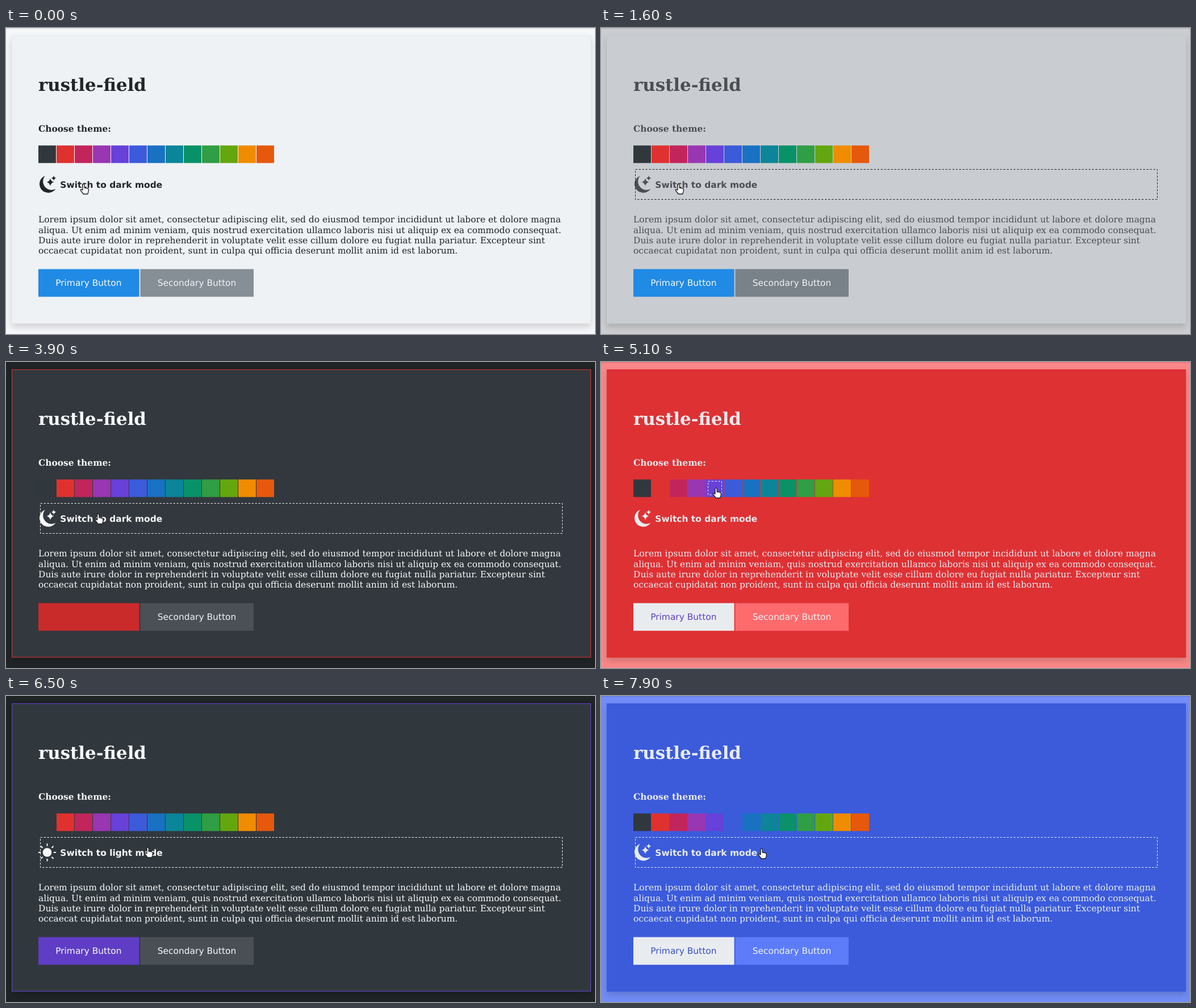
Animation, 1037 px wide and 540 px high, one loop 8 s. Source, as an HTML page:

```html
<!DOCTYPE html>
<html lang="en">
<head>
<meta charset="utf-8">
<title>Theme switcher</title>
<style>
  html, body { margin: 0; width: 100%; height: 100%; overflow: hidden; }
  svg { display: block; width: 1037px; height: 540px; background: var(--page); }
  text { font: 15.44px "DejaVu Serif", serif; text-rendering: geometricPrecision; fill: var(--text); }
  .title { font-size: 30.88px; font-weight: bold; }
  .label { font-weight: bold; }
  .sans { font-family: "DejaVu Sans", sans-serif; }
  .card { fill: var(--card); filter: drop-shadow(0 6px 6px rgba(0, 0, 0, .16)); }
  .edge { fill: none; stroke: var(--edge); }
  .icon { fill: var(--text); }
  .rays { stroke: var(--text); stroke-width: 2; }
  .focus { fill: none; stroke: var(--focus); stroke-dasharray: 3.4 2.6; }
  .primary { fill: var(--primary); }
  .secondary { fill: var(--secondary); }
  .on-primary { fill: var(--onPrimary); }
  .on-secondary { fill: var(--onSecondary); }
</style>
</head>
<body>
<svg id="stage" viewBox="0 0 1037 540">
  <rect width="1037" height="1.5" opacity=".1"/>
  <rect class="card" x="10" y="13" width="1020" height="508.5"/>
  <rect class="edge" x="10.5" y="13.5" width="1019" height="507.5"/>

  <text class="title" x="57" y="111">rustle-field</text>
  <text class="label" x="57" y="183">Choose theme:</text>
  <g id="swatches"></g>

  <g id="moon" class="icon">
    <path d="M69 260.8A15.5 15.5 0 1 0 87.3 284A15 15 0 0 1 69 260.8Z"/>
    <path d="M78 265.2Q79.2 270.8 84.6 272Q79.2 273.2 78 278.8Q76.8 273.2 71.4 272Q76.8 270.8 78 265.2Z"/>
    <path d="M84 260.6Q84.8 264.2 88.3 265Q84.8 265.8 84 269.4Q83.2 265.8 79.7 265Q83.2 264.2 84 260.6Z"/>
  </g>
  <g id="sun" class="icon">
    <circle cx="72.5" cy="276" r="7.8"/>
    <g id="rays" class="rays"></g>
  </g>
  <text id="toggle" class="label sans" x="95.3" y="281.5"></text>
  <rect id="focus" class="focus"/>

  <g id="copy"></g>

  <rect class="primary" x="57" y="425.5" width="177.6" height="48.8"/>
  <rect class="secondary" x="236.4" y="425.5" width="199.6" height="48.8"/>
  <text class="sans on-primary" x="87.2" y="455.3">Primary Button</text>
  <text class="sans on-secondary" x="266.8" y="455.3">Secondary Button</text>

  <path id="cursor" fill="#fff" stroke="#1b1b1b" stroke-width="1.3" stroke-linejoin="round"
    d="M-2 11V2a1.6 1.6 0 0 1 3.2 0V7l5 .9q2.3.5 2.2 2.5l-.5 4-1.2 3.6H-.8L-5.6 11.5q-.6-2 1.2-1.9z"/>
</svg>
<script>
const LOOP = 8000, TICK = 100, FADE = 500;
const $ = id => document.getElementById(id);
const stage = $('stage');

function add(parent, tag, attrs, content = '') {
  const el = document.createElementNS('http://www.w3.org/2000/svg', tag);
  for (const key in attrs) el.setAttribute(key, attrs[key]);
  el.textContent = content;
  parent.append(el);
}

const swatches = ['#31383d', '#e03131', '#c2255c', '#9936b2', '#6741d9', '#3b5bdb', '#1971c2',
  '#0c8599', '#099268', '#2f9e44', '#64a60f', '#f08c00', '#e6590c'];
const copy = [
  'Lorem ipsum dolor sit amet, consectetur adipiscing elit, sed do eiusmod tempor incididunt ut labore et dolore magna',
  'aliqua. Ut enim ad minim veniam, quis nostrud exercitation ullamco laboris nisi ut aliquip ex ea commodo consequat.',
  'Duis aute irure dolor in reprehenderit in voluptate velit esse cillum dolore eu fugiat nulla pariatur. Excepteur sint',
  'occaecat cupidatat non proident, sunt in culpa qui officia deserunt mollit anim id est laborum.'
];
swatches.forEach((fill, i) =>
  add($('swatches'), 'rect', { x: 57 + 32 * i, y: 207.3, width: 31, height: 31, fill }));
copy.forEach((line, i) => add($('copy'), 'text', { x: 57, y: 343.3 + 18.33 * i }, line));
for (let i = 0; i < 8; i++) {
  add($('rays'), 'path', { d: 'M72.5 264.8V260.4', transform: `rotate(${45 * i} 72.5 276)` });
}

const LIGHT = '#e9ecef', WHITE = '#f8f9fa', INK = '#212529';
const night = { page: '#1f2427', card: '#31383d', text: WHITE, secondary: '#4a4f56',
  focus: WHITE, onPrimary: WHITE, onSecondary: WHITE };

function theme(page, card, secondary, deep) {
  return {
    light: { page, card, edge: card, text: LIGHT, primary: LIGHT, secondary,
      focus: LIGHT, onPrimary: deep, onSecondary: '#f1f3f5' },
    dark: { ...night, edge: card, primary: deep }
  };
}
const plain = {
  light: { page: '#f6f7f9', card: '#eef2f5', edge: '#e9ecef', text: INK, primary: '#208ae5',
    secondary: '#868e96', focus: INK, onPrimary: WHITE, onSecondary: '#f1f3f5' },
  dark: { ...night, edge: '#343a40', primary: '#208ae5' }
};
const red = theme('#fc8886', '#e03131', '#ff6b6b', '#c92a2a');
const violet = theme('#9775fa', '#6741d9', '#845ef7', '#5f3dc4');
const indigo = theme('#728df8', '#3b5bdb', '#5c7cfa', '#364fc7');

// Clicks: time, theme, mode, focused swatch (-1 is the toggle)
const clicks = [
  [-FADE, plain, 'light', null],
  [490, plain, 'dark', -1],
  [1350, plain, 'light', -1],
  [2290, red, 'light', 1],
  [3090, red, 'dark', -1],
  [3895, red, 'light', -1],
  [5085, violet, 'light', 4],
  [5990, violet, 'dark', -1],
  [6590, indigo, 'dark', 5],
  [7290, indigo, 'light', -1]
];

// Pointer: time, x, y
const path = [
  [0, 137, 275], [1700, 137, 275], [2100, 106, 222], [2400, 106, 222], [2700, 159, 266],
  [2900, 162, 267], [4300, 163, 268], [4600, 275, 236], [4700, 275, 236], [4800, 182, 224],
  [4900, 182, 224], [5000, 203, 222], [5200, 203, 222], [5600, 250, 267], [6500, 250, 267],
  [6600, 231, 222], [6700, 231, 222], [7000, 283, 269], [LOOP, 283, 269]
];

const mix = (a, b, k) => a + (b - a) * k;
const rgb = hex => [1, 3, 5].map(i => parseInt(hex.slice(i, i + 2), 16));
const blend = (a, b, k) => {
  const to = rgb(b);
  return `rgb(${rgb(a).map((v, i) => Math.round(mix(v, to[i], k)))})`;
};

// The CSS "ease" curve
function ease(x) {
  if (x >= 1) return 1;
  const bez = (p, q, s) => 3 * p * s * (1 - s) ** 2 + 3 * q * s * s * (1 - s) + s ** 3;
  let lo = 0, hi = 1;
  for (let i = 0; i < 20; i++) {
    const mid = (lo + hi) / 2;
    if (bez(.25, .25, mid) < x) lo = mid; else hi = mid;
  }
  return bez(.1, 1, lo);
}

function setFocus(target) {
  const el = $('focus');
  el.style.display = target === null ? 'none' : '';
  if (target === null) return;
  const [x, y, width, height] = target < 0
    ? [60.5, 249.5, 919, 53] : [60.5 + 32 * target, 210.5, 24, 24];
  Object.entries({ x, y, width, height }).forEach(([k, v]) => el.setAttribute(k, v));
}

function draw(t) {
  let n = clicks.length - 1;
  while (clicks[n][0] > t) n--;
  const [start, colors, mode, target] = clicks[n];
  const [, oldColors, oldMode] = clicks[Math.max(0, n - 1)];
  const from = oldColors[oldMode], to = colors[mode];
  const k = ease((t - start) / FADE);

  for (const name of ['page', 'card', 'edge', 'text', 'primary', 'secondary']) {
    stage.style.setProperty('--' + name, blend(from[name], to[name], k));
  }
  for (const name of ['focus', 'onPrimary', 'onSecondary']) {
    stage.style.setProperty('--' + name, to[name]);
  }

  const dark = mode === 'dark';
  $('moon').style.display = dark ? 'none' : '';
  $('sun').style.display = dark ? '' : 'none';
  $('toggle').textContent = `Switch to ${dark ? 'light' : 'dark'} mode`;
  setFocus(target);

  const i = path.findIndex(p => p[0] > t);
  const [t0, x0, y0] = path[i - 1], [t1, x1, y1] = path[i];
  const p = (t - t0) / (t1 - t0);
  $('cursor').setAttribute('transform', `translate(${mix(x0, x1, p)} ${mix(y0, y1, p)})`);
}

let last = -1;
const origin = performance.now();
function tick() {
  const t = Math.floor((performance.now() - origin) % LOOP / TICK) * TICK;
  if (t !== last) draw(last = t);
  requestAnimationFrame(tick);
}
tick();
</script>
</body>
</html>
```
